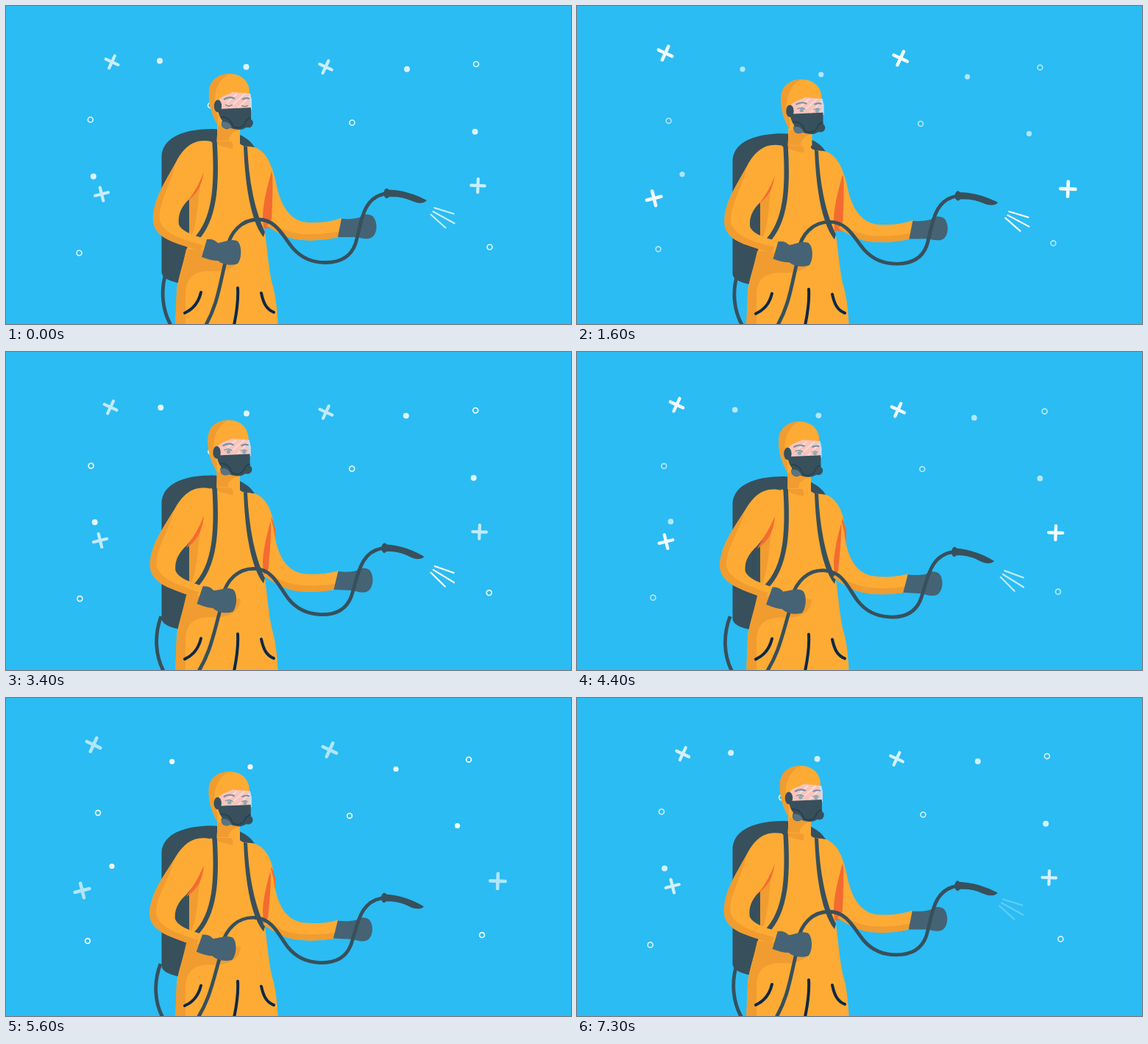
An HTML page for the animation above (7400 ms loop, 768 by 432 pixels).

```html
<!DOCTYPE html>
<html lang="en">
<head>
<meta charset="utf-8">
<title>Sprayer</title>
<style>
  html, body { margin: 0; width: 100%; height: 100%; overflow: hidden; background: #2bbcf3; }
  svg { display: block; width: 100vw; height: 100vh; }
  .suit { fill: #fdab35; }
  .shade { fill: #f09c30; }
  .red { fill: #f36b30; }
  .dark { fill: #37505c; }
  .glove { fill: #456374; }
  .line { fill: none; stroke: #37505c; stroke-width: 4.8; }
  .fold { fill: none; stroke: #0d2846; stroke-width: 4; stroke-linecap: round; }
  .white { fill: none; stroke: #fff; }
</style>
</head>
<body>
<svg viewBox="0 0 768 432">
  <rect width="768" height="432" fill="#2bbcf3"/>
  <g id="sparks"></g>
  <g id="figure">
    <path class="dark" d="M211.500 361V206C211.500 176 248 167 280 167C310 168 330 178 338 192L300 250L262 376H233C221 373 211.500 369 211.500 361Z"/>
    <g class="swing"><path class="line" d="M218 360C210 385 211 415 228 440"/></g>

    <!-- torso and legs -->
    <path class="suit" d="M287 160L318 164V187C322 192 330 190 338 192C352 197 360 212 363 228L352 265L351 302C355 325 356 350 361 374C367 393 369 415 370 440H230L232 385C236 362 243 343 249 318L250 262L268 215L278 184L287 190Z"/>
    <path class="shade" d="M288 163L317 167C308 171 302 177 303 182C309 185 309 190 308 194C300 192 290 190 286 187Z"/>
    <path class="shade" d="M245 330L232 388L230 440H244V390C245 368 256 361 275 360C300 362 318 355 319 335Z"/>
    <path class="shade" d="M268 228C258 258 264 290 249 320V262Z"/>
    <path class="red" d="M269 222L245 266C258 257 267 245 269 222Z"/>
    <path class="red" d="M361 224C357 240 350 262 349 285L350 302H366V240Z"/>
    <path class="line" style="stroke-width:6.400" d="M283.500 184C287 240 285 290 257 318"/>
    <path class="dark" d="M323 190L328 191C330 235 337 275 352 307L350 314C333 293 325 245 323 190Z"/>
    <path class="fold" d="M265 389C262 402 254 412 243 417M315 383C316 400 313 420 309 438M347 390C350 404 354 412 364 416"/>

    <g id="head">
      <path class="suit" d="M304 92C321 92 333 104 331 122L332 148L318 168V184H288V162C280 148 275 134 276 116C277 101 289 92 304 92Z"/>
      <path class="shade" d="M304 92C287 93 277 101 276 116C275 134 280 148 288 162V150C281 132 281 103 304 92Z"/>
      <path class="shade" d="M288 162L317 168C308 171 302 177 303 183H288Z"/>
      <path fill="#f8c4bd" d="M288 130C290 123 301 121 308 117C316 118 324 118 332 119L334 128V141H288Z"/>
      <path fill="#c6dcec" d="M330 119H332L334 128V141H331Z"/>
      <path fill="none" stroke="#fff" stroke-width="1.500" opacity=".5" d="M300 132L314 119M304 138L325 119M315 139L331 123"/>
      <path fill="none" stroke="#7990a0" stroke-width="2.200" d="M296 127Q304 122 311 126M321 127Q326 124 331 126"/>
      <g id="open">
        <path fill="none" stroke="#78909d" stroke-width="1.200" d="M298 133Q304 129 309 134M320 134Q325 131 329 134"/>
        <circle cx="304" cy="135" r="2.800" fill="#8eaab7"/>
        <circle cx="325" cy="135.500" r="2.600" fill="#8eaab7"/>
      </g>
      <path id="closed" fill="none" stroke="#8a7d88" stroke-width="1.400" d="M298 134Q303 138 308 134M320 135Q325 138 329 135"/>
      <path class="dark" d="M288 140C302 139 319 139 333 138V152C333 162 325 168 317 168C308 168 300 164 296 158C291 153 289 147 288 140Z"/>
      <ellipse class="dark" cx="288" cy="136" rx="5.200" ry="8.500"/>
      <circle class="dark" cx="329.500" cy="159" r="6.300"/>
      <circle class="dark" cx="300" cy="160" r="7.200"/>
      <path fill="none" stroke="#263e4d" stroke-width="1.500" d="M292 151C300 150 306 155 308 163C313 167 322 166 325 159Q327 153 333 152"/>
      <path fill="#587483" d="M293 158Q302 155 307 165Q299 169 294 164Z"/>
    </g>

    <g class="swing">
      <path class="suit" d="M330 193C350 190 360 212 366 235C371 264 382 292 410 294C430 295 445 292 456 288L452 314C425 320 397 320 381 313C371 309 363 304 355 299L361 290C362 270 363 245 362 228C358 215 352 208 340 215Z"/>
      <path class="shade" d="M354 297C375 299 382 311 415 310C430 310 444 308 453 306L452 314C425 320 397 320 381 313C371 309 362 304 354 297Z"/>
      <path class="suit" d="M279 184C258 180 243 188 230 214C217 238 200 262 200 290C201 318 234 322 264 333L273 317C258 312 240 308 235 297C233 283 239 272 249 262C262 245 267 230 270 222L279 205Z"/>
      <path class="shade" d="M230 214C217 238 200 262 200 290C201 318 234 322 264 333L268 325C245 318 216 312 209 292C206 268 224 245 230 214Z"/>
      <path class="glove" d="M456 289C466 290 475 289 481 287C485 282 494 282 499 286C505 293 505 307 499 313C494 318 485 316 477 314H451Z"/>
      <path class="line" d="M269 438C287 408 290 382 298 348M300 330C305 307 320 290 343 290C368 290 377 314 390 329C403 344 418 348.500 434 348.500C456 348.500 469 340 475 323C483 297 483 259 518 254.500"/>
      <ellipse class="dark" cx="517.500" cy="254.500" rx="4" ry="6.800"/>
      <path class="dark" d="M518 249.500C540 249.500 560 257.500 572 264C568 269 559 268.500 551 264.500C540 259.500 530 258.500 518 259.500Z"/>
      <path class="glove" d="M273 317C280 316 284 318 288 322C297 321 304 316 314 319C321 324 321 343 315 350C306 353 295 352 288 346C281 346 274 344 266 341Z"/>
      <path id="spray" class="white" stroke-width="2.200" stroke-linecap="round" d="M582 274L608 282M580 279L609 295M577 283L597 301"/>
    </g>
  </g>
</svg>
<script>
const LOOP = 7400;
const byId = id => document.getElementById(id);
const wave = (t, cycles, peak = 0) => Math.cos(2 * Math.PI * cycles * (t - peak) / LOOP);
const clamp = v => Math.max(0, Math.min(1, v));

// Start x, y, end x, y and, for crosses, tilt
const crosses = [
  [144, 76, 119, 63.5, 25], [434.5, 82.7, 440, 70.5, 25],
  [130, 255.5, 103.5, 261.5, -14], [641.5, 244, 668.5, 248.7, 2]
];
const dots = [
  [209, 74.5, 225.7, 86.3], [326.5, 82.7, 332, 93.5], [545, 85.8, 530, 96.5],
  [637.5, 170.7, 613.5, 173.5], [118.8, 231.5, 144, 228.5]
];
const rings = [
  [639, 79, 629, 83.7], [114.8, 154.5, 125, 156], [470.5, 158.5, 467, 160],
  [657.5, 327.5, 647, 322], [99.5, 335.5, 111, 330], [278, 135, 284, 140]
];

function addSparks(places, markup, growth, blink) {
  return places.map(([x, y, endX, endY, tilt = 0]) => {
    byId("sparks").insertAdjacentHTML("beforeend", `<g>${markup}</g>`);
    return { node: byId("sparks").lastElementChild, x, y, dx: endX - x, dy: endY - y, tilt, growth, blink };
  });
}
const sparks = [
  ...addSparks(crosses, '<path class="white" stroke-width="4.200" stroke-linecap="round" d="M-9.200 0H9.200M0-9.200V9.200"/>', .1, -1),
  ...addSparks(dots, '<circle r="4" fill="#fff"/>', -.1, 1),
  ...addSparks(rings, '<circle class="white" r="3.500" stroke-width="1.700"/>', -.03, 1)
];

function draw(t) {
  const bob = (1 - wave(t, 2)) / 2;
  const swing = wave(t, 1, 900);
  const lean = wave(0, 1, 900) - swing;

  const drift = bob ** .93;
  const glow = wave(t, 3, 520);
  for (const s of sparks) {
    s.node.setAttribute("transform", `translate(${s.x + s.dx * drift} ${s.y + s.dy * drift}) rotate(${s.tilt}) scale(${1 + s.growth * drift})`);
    s.node.setAttribute("opacity", .79 + .17 * s.blink * glow);
  }

  // The figure is squashed towards a point below the stage
  byId("figure").setAttribute("transform", `translate(0 468) scale(1 ${1 - .0213 * bob}) translate(0 -468)`);
  byId("head").setAttribute("transform", `translate(${1.4 * bob - 1.2 * lean} 0)`);
  for (const part of document.querySelectorAll(".swing"))
    part.setAttribute("transform", `rotate(${1.9 * lean} 240 185)`);

  const blinking = t < 150;
  byId("open").setAttribute("opacity", blinking ? 0 : 1);
  byId("closed").setAttribute("opacity", blinking ? 1 : 0);

  // One long burst per loop, pushed out quickly and then held
  const sprayTime = (t + 150) % LOOP;
  const push = -4 + 9 * clamp(sprayTime / 300);
  byId("spray").setAttribute("transform", `translate(${push} ${push / 2})`);
  byId("spray").setAttribute("opacity", clamp(Math.min(sprayTime / 200, (4690 - sprayTime) / 200)));
}

function tick(now) {
  draw(Math.floor(now / 100) * 100 % LOOP);
  requestAnimationFrame(tick);
}
draw(0);
requestAnimationFrame(tick);
</script>
</body>
</html>
```
